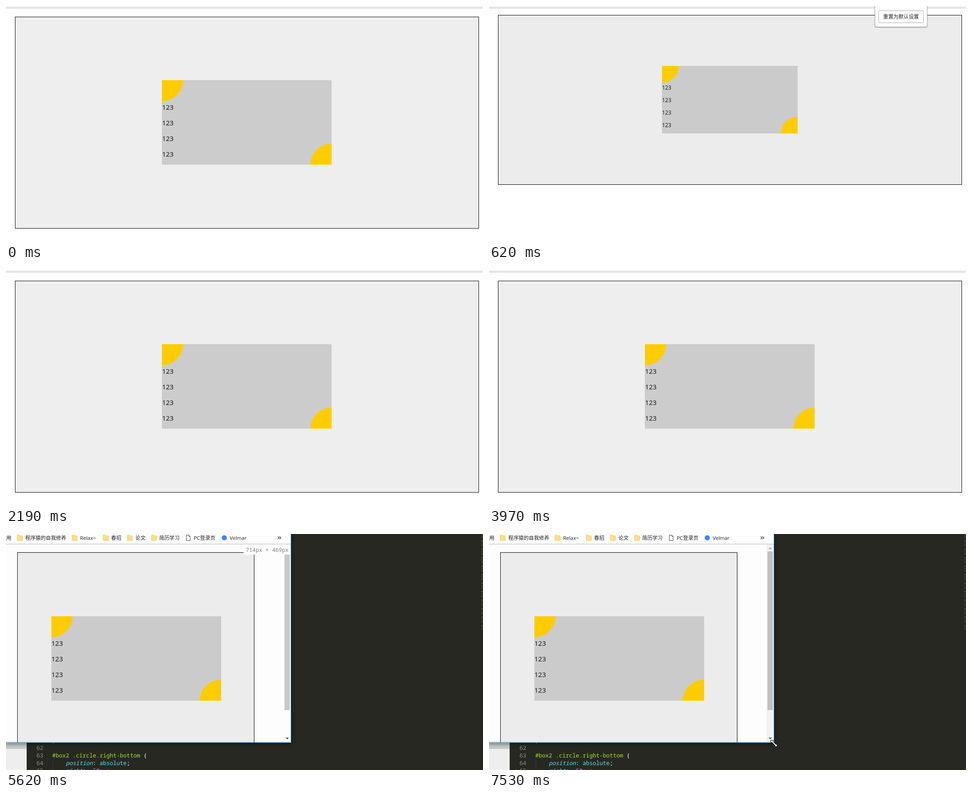
An HTML page that plays this animation: 1062 px wide and 528 px high, repeating every 8 s.

```html
<!DOCTYPE html>
<html lang="zh">
<head>
<meta charset="utf-8">
<title>Zoom and resize</title>
<style>
html, body { margin: 0; width: 100%; height: 100%; overflow: hidden; background: #fff; }
svg { display: block; width: 1062px; height: 528px; }
text { white-space: pre; font-family: "Open Sans", "Noto Sans CJK SC", "Noto Sans CJK", sans-serif; }
rect { shape-rendering: crispEdges; }
.ui { font-size: 11.4px; fill: #222; }
.code text { font: 12.55px "Noto Sans Mono", "DejaVu Sans Mono", monospace; fill: #f8f8f2; }
.code .num { fill: #90908a; }
.green { fill: #a6e22e; }
.cyan { fill: #66d9ef; }
.italic { font-style: italic; }
.purple { fill: #ae81ff; }
.pink { fill: #f92672; }
#label text { font: 12.2px "Noto Sans Mono", "DejaVu Sans Mono", monospace; fill: #808080; }
#win { filter: drop-shadow(0 2px 5px rgba(0, 0, 0, .55)); }
</style>
</head>
<body>
<svg id="stage" viewBox="0 0 1062 528"></svg>
<script>
const rect = (x, y, w, h, fill, extra = '') =>
  `<rect x="${x}" y="${y}" width="${w}" height="${h}" fill="${fill}" ${extra}/>`;
const text = (x, y, s, attr = 'class="ui"') => `<text x="${x}" y="${y}" ${attr}>${s}</text>`;
const span = (cls, s) => `<tspan class="${cls}">${s}</tspan>`;

// Bordered area with the grey card at (x, y), scaled by the zoom factor k
function card(left, top, right, bottom, x, y, k, back = '#ececec', grey = '#cbcbcb') {
  const w = 377.5 * k, h = 189 * k, r = 47.2 * k;
  return rect(left, top, right - left, bottom - top, back, 'stroke="#000"') +
    rect(x, y, w, h, grey) +
    `<path fill="#fc0" d="M${x} ${y}h${r}a${r} ${r} 0 0 1 ${-r} ${r}z
      M${x + w} ${y + h}h${-r}a${r} ${r} 0 0 1 ${r} ${-r}z"/>` +
    [0, 1, 2, 3].map(i =>
      text(x, y + (66.3 + 35 * i) * k, '123', `font-size="${15 * k}" fill="#111"`)).join('');
}

const toolbar = rect(0, 0, 1062, 4, '#f2f2f2') + rect(0, 4, 1062, 1, '#b6b6b6');

const popup = `<g style="filter:drop-shadow(0 1px 1px rgba(0,0,0,.4))">
  <rect x="859.5" y="-6" width="116" height="52" rx="2" fill="#fff" stroke="#bbb"/></g>
  <rect x="867.5" y="10.5" width="100" height="27" rx="2" fill="#fdfdfd" stroke="#aaa"/>` +
  text(877.5, 28, '重置为默认设置');

const folder = x => `<path d="M${x} 2.5h5l1 1.5h5.500v10.500h-11.500z" fill="#ffe08a" stroke="#e8bd50" stroke-width=".8"/>`;

const bookmarks = text(.5, 13, '用') +
  [[25, '程序猿的自我修养', 43], [147, 'Relax~', 165], [216.500, '春招', 234],
   [270, '论文', 288], [324, '简历学习', 341]]
    .map(([x, name, tx]) => folder(x) + text(tx, 13, name)).join('') +
  '<path d="M401.500 2.500h5.500l3 3v9h-8.500zM407 2.500v3h3" fill="#fff" stroke="#444"/>' +
  text(418, 13, 'PC登录页') +
  '<circle cx="486" cy="8.500" r="5.800" fill="#4285f4"/>' +
  text(498, 13, 'Velmar') +
  '<path d="M605 5.500l3 3-3 3m4-6l3 3-3 3" fill="none" stroke="#333" stroke-width="1.300"/>';

const browser = `<g id="win"><g clip-path="url(#frame)">` +
  rect(-5, -5, 640, 472, '#fdfdfd') +
  bookmarks + rect(0, 22, 634, 1, '#b6b6b6') +
  card(25.5, 41.5, 552.5, 520, 101, 184, 1) +
  `<g id="bar">${rect(618, 23, 16, 443, '#f1f1f1')}${rect(620, 39, 12, 355, '#c1c1c1')}
    <path d="M622.500 33.500l3.700-4 3.700 4z" fill="#a3a3a3"/></g>
  <g id="label">${rect(620, 46, 12, 348, '#c9c9c9')}${rect(529, 26, 105, 20, '#fdfdfd')}
    ${text(534, 39.5, '714px × 469px', '')}</g>
  <path d="M622.500 455.500l3.700 4 3.700-4z" fill="#505050"/>
  <path id="edge" d="M634.500-5V466H-5" fill="none"/></g></g>`;

const code = (n, body) => text(68, 466 + (n - 61) * 17, n, 'class="num"') +
  text(103, 466 + (n - 61) * 17, body, '');

const editor = rect(0, 0, 1062, 528, '#272822') +
  rect(0, 460, 46, 9, '#e0e0e0') + rect(0, 469, 46, 12, '#c9c9c9') + rect(0, 481, 46, 47, '#eee') +
  rect(104, 505, 1, 23, '#3b3c35') +
  '<path d="M1060 0V216" stroke="#777632" stroke-width="3" stroke-dasharray="1 3 1 2 1 6 2 3" opacity=".75"/>' +
  '<g class="code">' + code(61, '}') + code(62, '') +
  code(63, span('green', '#box2 .circle.right-bottom') + ' {') +
  code(64, '    ' + span('cyan italic', 'position') + ': ' + span('cyan', 'absolute') + ';') +
  code(65, '    ' + span('cyan italic', 'right') + ': ' + span('pink', '-') +
    span('purple', '50') + span('pink', 'px') + ';') + '</g>' + browser;

const arrows = 'M-7-7h6l-2 2 8 8 2-2v6h-6l2-2-8-8-2 2z';
const pointers = {
  tip: '<path d="M0 0v4l3-1z" fill="#fff" stroke="#333"/>',
  beam: '<path d="M-3-7.500h2.500l.5 1 .5-1H3M0-6.500v13M-3 7.500h2.500l.5-1 .5 1H3" fill="none" stroke="#ddd"/>',
  diag: `<path d="${arrows}" fill="#fff" stroke="#000"/>`,
  wide: `<path d="${arrows}" transform="rotate(-45)" fill="#fff" stroke="#000"/>`
};

const scenes = {
  full: toolbar + card(20.5, 24.5, 1052.5, 497.5, 347.4, 166, 1, '#eee', '#ccc'),
  mid: toolbar + card(20.5, 22.5, 1052.5, 448.5, 366.3, 150, .9) + popup,
  small: toolbar + card(20.5, 20.5, 1052.5, 399.5, 385.2, 134, .8) + popup,
  editor
};

const group = (set, prefix) => Object.entries(set)
  .map(([id, body]) => `<g id="${prefix}${id}">${body}</g>`).join('');
const stage = document.getElementById('stage');
stage.innerHTML = '<defs><clipPath id="frame"><rect x="-5" y="-5" width="640" height="472"/></clipPath></defs>' +
  rect(0, 0, 1062, 528, '#fff') + group(scenes, 's-') + group(pointers, 'p-');

const sceneTimes = [[0, 'full'], [500, 'mid'], [620, 'small'], [1890, 'mid'], [2190, 'full'], [5470, 'editor']];
const pointerTimes = [
  [0], [3840, 'tip', 1047, 526.5], [3970],
  [6030, 'beam', 1058, 8], [6160, 'beam', 918, 222], [6290, 'beam', 805.5, 391.5],
  [6440, 'beam', 708.5, 476.5], [6580, 'beam', 660.5, 476.5], [6710, 'beam', 632.5, 476.5],
  [6850, 'diag', 635, 470], [6980, 'wide', 635, 469], [7530, 'diag', 634.5, 468.5]
];

const el = id => document.getElementById(id);
const at = (list, t) => list.findLast(e => e[0] <= t);
const show = (id, on) => { el(id).style.display = on ? '' : 'none'; };

function draw(now) {
  const t = now % 8000;
  const [, scene] = at(sceneTimes, t);
  const [, pointer, x, y] = at(pointerTimes, t);
  for (const id in scenes) show('s-' + id, id === scene);
  for (const id in pointers) show('p-' + id, id === pointer);
  if (pointer) el('p-' + pointer).setAttribute('transform', `translate(${x} ${y})`);

  // The window settles from a slightly enlarged, translucent state
  const opening = t < 5620;
  el('win').setAttribute('transform', opening ? 'translate(-9.2 -5.4) scale(1.0095)' : '');
  el('win').setAttribute('opacity', opening ? .985 : 1);
  el('edge').setAttribute('stroke', opening ? '#5a93b5' : '#2685cf');
  show('bar', t >= 6440);
  show('label', t < 6440);
  requestAnimationFrame(draw);
}
draw(performance.now());
</script>
</body>
</html>
```
